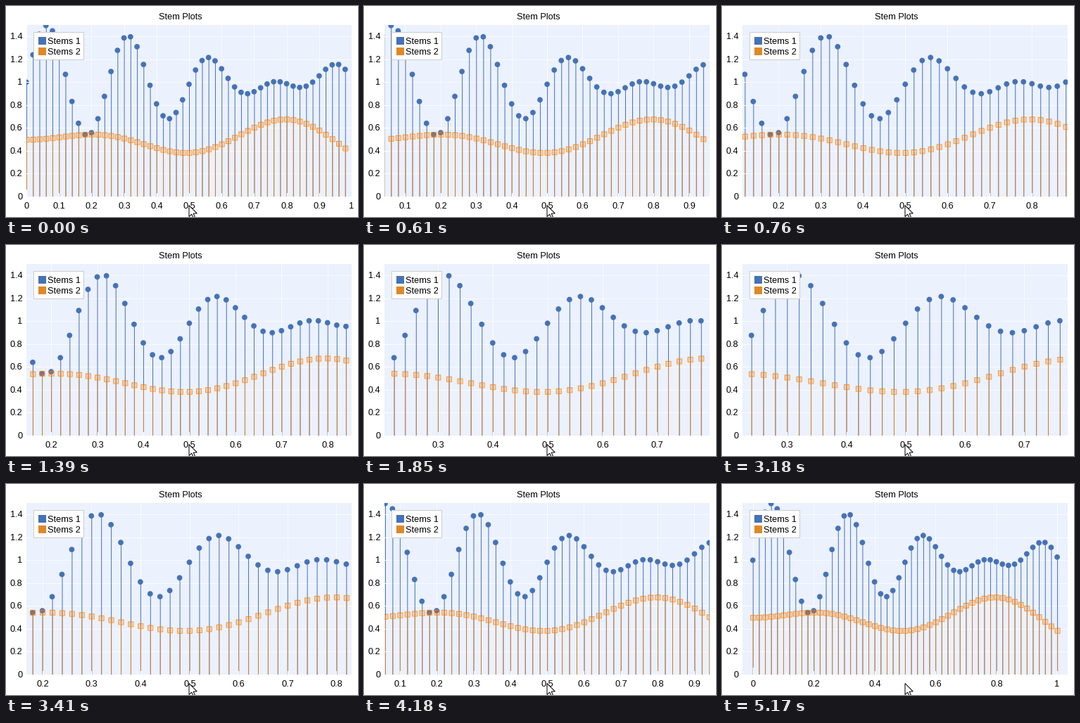
A matplotlib script for the animation above (5640 ms loop, 500 by 300 pixels).

```python
import math

import matplotlib.pyplot as plt
import numpy as np
from matplotlib.animation import FuncAnimation
from matplotlib.collections import LineCollection, PolyCollection
from matplotlib.patches import Polygon, Rectangle

WIDTH, HEIGHT, DPI = 500, 300, 100
LOOP_MS, STEP_MS = 5640, 20
PX = 72 / DPI  # points per pixel

LEFT, TOP, RIGHT, BOTTOM = 29, 27, 491, 271
Y_MAX = 1.5
MOUSE_X = 259

# Mouse wheel clicks in ms
ZOOM_IN = (610, 690, 760, 1390, 1540, 1620, 2230, 2400)
ZOOM_OUT = (3180, 3260, 3330, 4020, 4100, 4180, 4790, 4940)
IN_FACTOR, OUT_FACTOR = 11 / 12, 1.1

BLUE = "#4672b6"
LINE_ORANGE = (1, 0.5, 0, 0.75)
FILL_ORANGE = (1, 0.5, 0, 0.25)
LEGEND_ORANGE = "#e08828"
PLOT_BG = "#ebf1fd"
MINOR_GRID = (1, 1, 1, 0.75)
MAJOR_GRID = (1, 1, 1, 1)

xs = np.arange(51) * 0.02
ys1 = 1 + 0.5 * np.sin(25 * xs) * np.cos(2 * xs)
ys2 = 0.5 + 0.25 * np.sin(10 * xs) * np.sin(xs)

plt.rcParams["font.family"] = "Liberation Sans"
fig = plt.figure(figsize=(WIDTH / DPI, HEIGHT / DPI), dpi=DPI, facecolor="white")
ax = fig.add_axes([0, 0, 1, 1])
ax.set_xlim(0, WIDTH)
ax.set_ylim(HEIGHT, 0)
ax.set_axis_off()


def to_y(value):
    return BOTTOM - np.asarray(value) / Y_MAX * (BOTTOM - TOP)


def nearest_pixel(value):
    return np.floor(np.asarray(value) + 0.5)


def ring(count, radius, turn=0.0):
    angles = 2 * np.pi * (np.arange(count) + turn) / count
    return radius * np.column_stack((np.cos(angles), np.sin(angles)))


def box(x0, y0, x1, y1, color, zorder, **style):
    return ax.add_patch(Rectangle((x0, y0), x1 - x0, y1 - y0, facecolor=color,
                                  zorder=zorder, snap=False, **style))


def label(x, y, text="", align="center"):
    return ax.text(x, y, text, ha=align, va="baseline", fontsize=12.7 * PX,
                   color="black", zorder=20)


def add_clipped(collection):
    ax.add_collection(collection, autolim=False)
    collection.set_clip_path(plot_area)
    return collection


def segments(zorder, color="white"):
    return add_clipped(LineCollection([], colors=color, linewidths=PX, zorder=zorder,
                                      capstyle="butt", snap=False))


def polygons(zorder, face, edge="none"):
    return add_clipped(PolyCollection([], facecolors=[face], edgecolors=[edge],
                                      linewidths=PX, zorder=zorder, snap=False))


plot_area = box(LEFT, TOP, RIGHT, BOTTOM, PLOT_BG, 1)
grid = segments(2)
stems1 = segments(3, BLUE)
dots = polygons(4, BLUE)
stems2 = segments(5, [LINE_ORANGE])
square_fills = polygons(6, FILL_ORANGE)
square_lines = polygons(7, "none", LINE_ORANGE)
ticks = segments(8)

CIRCLE = ring(10, 4)
SQUARE = ring(4, 5, 0.5)

label(248, 19, "Stem Plots")
y_ticks = np.arange(8) * 0.2
y_lines = nearest_pixel(to_y(y_ticks)) + 0.5
for value, y in zip(y_ticks, y_lines):
    label(23.5, y + 3.7, f"{value:g}", "right")

# Legend
box(39.5, 37.5, 110.5, 76.5, "white", 10, edgecolor="#cccccc", linewidth=PX)
for row, (name, color) in enumerate((("Stems 1", BLUE), ("Stems 2", LEGEND_ORANGE))):
    y = 44 + 15 * row
    box(46, y, 57, y + 11, color, 11)
    label(59, y + 10, name, "left")

# Mouse pointer
arrow = np.array([(0, 0), (0, 16), (3.7, 12.6), (6.4, 18.6), (8.8, 17.6),
                  (6.2, 11.6), (11.3, 11.4)])
ax.add_patch(Polygon(arrow + (260, 283.5), facecolor="white", edgecolor="black",
                     linewidth=PX, zorder=30))

x_labels = [label(0, 288) for _ in range(14)]


def x_limits(t):
    """Start and size of the visible range at time t, zoomed about the mouse."""
    size = (IN_FACTOR ** sum(t >= click for click in ZOOM_IN)
            * OUT_FACTOR ** sum(t >= click for click in ZOOM_OUT))
    anchor = (MOUSE_X - LEFT) / (RIGHT - LEFT)
    return anchor * (1 - size), size


def nice_ceiling(value):
    power = 10.0 ** math.floor(math.log10(value))
    return next(n * power for n in (1, 2, 5, 10) if value <= n * power)


def vertical(x, top):
    return [[(a, b), (a, BOTTOM)] for a, b in zip(x, np.broadcast_to(top, len(x)))]


def draw(frame):
    low, size = x_limits(frame * STEP_MS + STEP_MS / 2)

    def to_x(value):
        return LEFT + (np.asarray(value) - low) / size * (RIGHT - LEFT)

    px = to_x(xs)
    seen = (px >= LEFT - 1e-6) & (px < RIGHT - 1e-6)

    def centers(ys):
        return np.column_stack((px, to_y(ys)))[seen][:, None]

    # Strokes run through pixel centres, fills do not
    stems1.set_segments(vertical(px + 0.5, to_y(ys1)))
    stems2.set_segments(vertical(px + 0.5, to_y(ys2)))
    dots.set_verts(centers(ys1) + CIRCLE)
    square_fills.set_verts(centers(ys2) + SQUARE)
    square_lines.set_verts(centers(ys2) + SQUARE + 0.5)

    step = nice_ceiling(size * 0.99) / 10
    first = math.ceil(low / step - 1e-6)
    last = math.floor((low + size) / step + 1e-6)
    index = np.arange(first, last + 1)
    major = index % 10 == 0
    tick_x = nearest_pixel(to_x(index * step))

    grid.set_segments(vertical(tick_x + 0.5, TOP)
                      + [[(LEFT, y), (RIGHT, y)] for y in y_lines])
    grid.set_color([MAJOR_GRID if m else MINOR_GRID for m in major]
                   + [MINOR_GRID] * len(y_lines))
    ticks.set_segments(vertical(tick_x + 0.5, BOTTOM - np.where(major, 10, 5))
                       + [[(LEFT, y), (LEFT + 5, y)] for y in y_lines])

    for i, text in enumerate(x_labels):
        shown = i < len(index)
        text.set_visible(shown)
        if shown:
            text.set_x(tick_x[i])
            text.set_text(f"{round(index[i] * step, 6):g}")
    return []


animation = FuncAnimation(fig, draw, frames=LOOP_MS // STEP_MS, interval=STEP_MS,
                          init_func=lambda: draw(0), repeat=True, repeat_delay=0)
plt.show()
```
